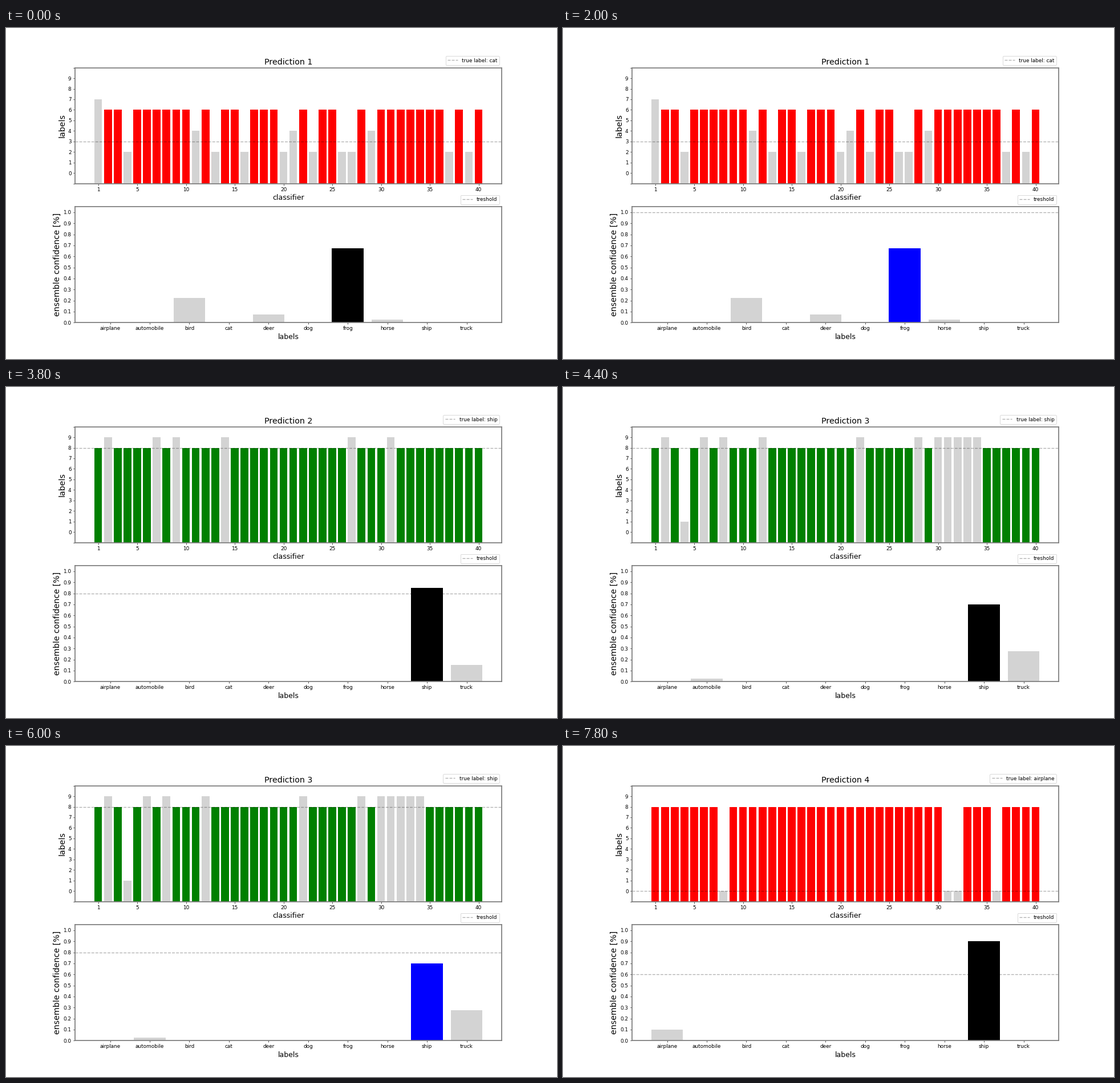
Recreate the animation shown at these times as a matplotlib script. Size 966x580 px, loop 8000 ms.

```python
import matplotlib.pyplot as plt
import numpy as np
from matplotlib.animation import FuncAnimation

DPI = 64
WIDTH, HEIGHT = 966, 580
VOTERS = 40
STEPS = 11  # thresholds 0.0 to 1.0 for each prediction
FRAMES = 40

CLASSES = ["airplane", "automobile", "bird", "cat", "deer",
           "dog", "frog", "horse", "ship", "truck"]

# true label, winning label, classifiers that voted for another label
PREDICTIONS = [
    (3, 6, {7: [1], 4: [11, 21, 29], 2: [4, 13, 16, 20, 23, 26, 27, 37, 39]}),
    (8, 8, {9: [2, 7, 9, 14, 27, 31]}),
    (8, 8, {1: [4], 9: [2, 6, 8, 12, 22, 28, 30, 31, 32, 33, 34]}),
    (0, 8, {0: [8, 31, 32, 36]}),
]


def cast_votes(winner, others):
    votes = np.full(VOTERS, winner)
    for label, voters in others.items():
        votes[np.array(voters) - 1] = label
    return votes


def style_axes(ax, xlabel, ylabel):
    ax.set_xlabel(xlabel, fontsize=14)
    ax.set_ylabel(ylabel, fontsize=16)
    for spine in ax.spines.values():
        spine.set(color="gray", linewidth=2)


def dashed_line(ax, label):
    line = ax.axhline(0, color="black", linestyle="--", alpha=0.3, label=label)
    legend = ax.legend(loc="lower right", bbox_to_anchor=(1, 1))
    return line, legend.get_texts()[0]


plt.rcParams["font.family"] = "DejaVu Sans"
fig, (top, bottom) = plt.subplots(2, 1, figsize=(WIDTH / DPI, HEIGHT / DPI), dpi=DPI)

vote_bars = top.bar(range(1, VOTERS + 1), np.ones(VOTERS), bottom=-1)
top.set_ylim(-1, 10)
top.set_xticks([1, *range(5, VOTERS + 1, 5)])
top.set_yticks(range(-1, 11), ["", *map(str, range(10)), ""])
title = top.set_title("Prediction 1", fontsize=16)
style_axes(top, "classifier", "labels")
truth_line, truth_text = dashed_line(top, "true label")

share_bars = bottom.bar(CLASSES, np.ones(len(CLASSES)))
bottom.set_ylim(0, 1.05)
levels = np.arange(STEPS) / 10
bottom.set_yticks(levels, [f"{level:.1f}" for level in levels])
style_axes(bottom, "labels", "ensemble confidence [%]")
level_line, _ = dashed_line(bottom, "treshold")


def update(frame):
    index, step = divmod(frame, STEPS)
    truth, winner, others = PREDICTIONS[index]
    votes = cast_votes(winner, others)
    shares = np.bincount(votes, minlength=len(CLASSES)) / VOTERS
    level = step / 10

    title.set_text(f"Prediction {index + 1}")
    truth_text.set_text(f"true label: {CLASSES[truth]}")
    truth_line.set_ydata([truth, truth])
    level_line.set_ydata([level, level])

    vote_color = "green" if winner == truth else "red"
    for bar, vote in zip(vote_bars, votes):
        bar.set_height(vote + 1)
        bar.set_facecolor(vote_color if vote == winner else "lightgray")

    win_color = "blue" if level >= shares[winner] else "black"
    for label, (bar, share) in enumerate(zip(share_bars, shares)):
        bar.set_height(share)
        bar.set_facecolor(win_color if label == winner else "lightgray")


anim = FuncAnimation(fig, update, frames=FRAMES, interval=200,
                     init_func=lambda: update(0), repeat=True, repeat_delay=0)
plt.show()
```
